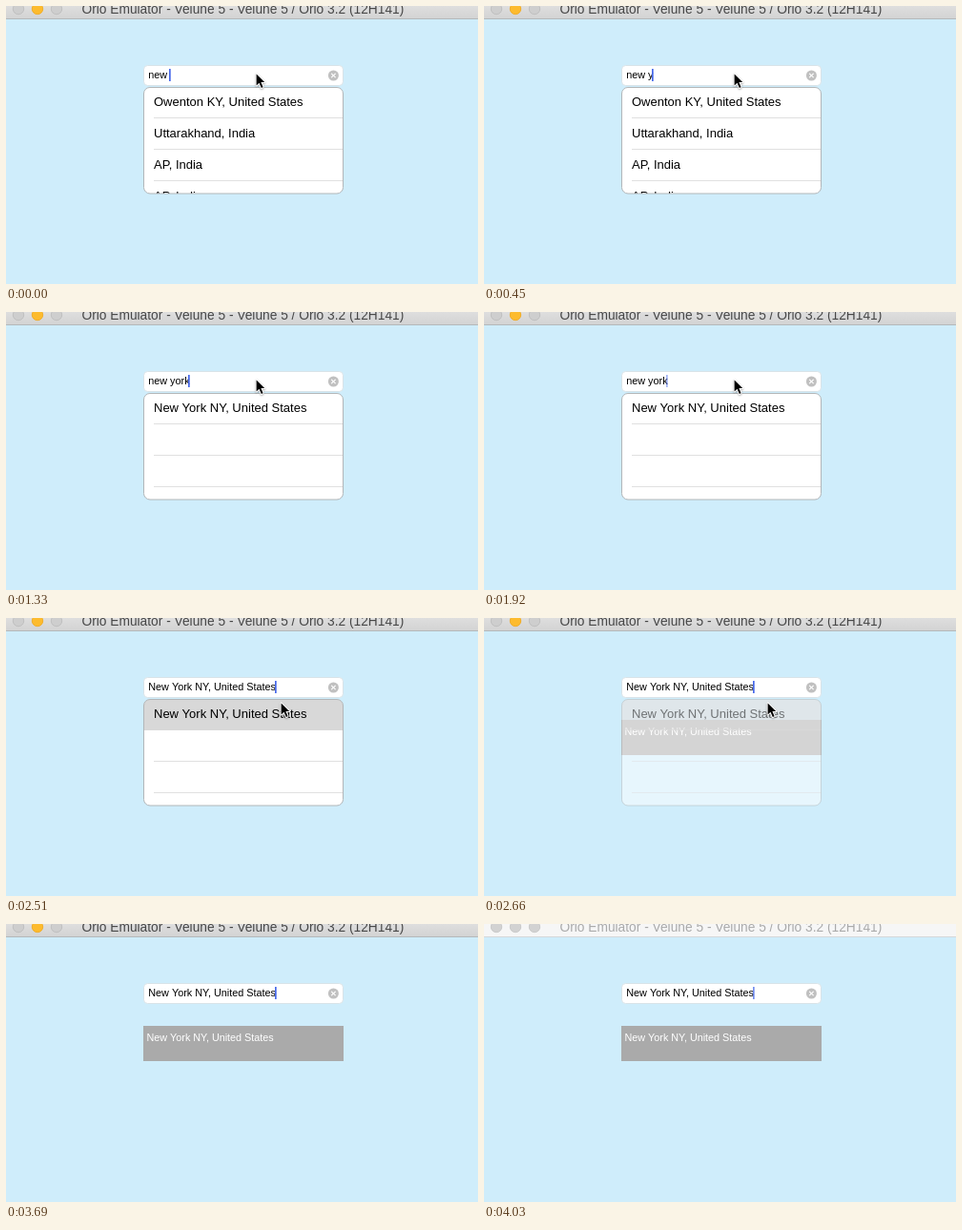
An HTML page with a canvas for the animation above (4.05 s loop, 495 by 292 pixels).

```html
<!DOCTYPE html>
<html lang="en">
<head>
<meta charset="utf-8">
<title>Place search</title>
<style>
html, body { margin: 0; width: 100%; height: 100%; overflow: hidden; background: #cfedfb; }
canvas { display: block; width: 495px; height: 292px; }
</style>
</head>
<body>
<canvas id="stage"></canvas>
<script>
const W = 495, H = 292, LOOP = 4050;
const FONT = '"Liberation Sans", Arial, sans-serif';
const PLACE = 'New York NY, United States';

const canvas = document.getElementById('stage');
const ctx = canvas.getContext('2d');
const ratio = window.devicePixelRatio || 1;
canvas.width = W * ratio;
canvas.height = H * ratio;

const oneLine = { pitch: 33, first: 117.5 };
const twoLine = { pitch: 48, first: 132.5 };
const lists = {
  wide: { ...oneLine, rows: [['Owenton KY, United States'], ['Uttarakhand, India'], ['AP, India'], ['AP, India']] },
  yarrow: { ...twoLine, rows: [['New Yarrow Rd, Ottermere TX', '00417, United States']] },
  tansey: { ...twoLine, rows: [['New Tansey Rd, Ferrowick CA', '00412, United States']] },
  city: { ...oneLine, rows: [[PLACE]] }
};

// Each step changes only the listed properties and holds until the next one.
const steps = [
  [0, { query: 'new ', caret: 1, list: 'wide', listAlpha: 1, picked: false, label: false, pointer: [262, 70], active: true }],
  [450, { query: 'new y' }],
  [590, { list: 'yarrow' }],
  [740, { query: 'new yo', list: 'tansey' }],
  [1330, { query: 'new york', list: 'city' }],
  [1920, { caret: 0.5 }],
  [2070, { caret: 0, pointer: [285, 106] }],
  [2220, { pointer: [286, 102] }],
  [2360, { caret: 0.5, pointer: [286, 97] }],
  [2510, { caret: 1, query: PLACE, picked: true, pointer: [288, 88] }],
  [2660, { label: true, listAlpha: 0.5, pointer: [297, 88] }],
  [2810, { listAlpha: 0, pointer: [306, 87] }],
  [2960, { pointer: [474, 246] }],
  [3100, { caret: 0.5, pointer: [418, 209] }],
  [3250, { caret: 0 }],
  [3400, { pointer: [450, 280] }],
  [3550, { caret: 0.5, pointer: null }],
  [3690, { caret: 1 }],
  [4030, { caret: 0.75, active: false }]
];

function stateAt(time) {
  return Object.assign({}, ...steps.filter(([start]) => start <= time).map(([, change]) => change));
}

function text(str, x, y, size, color) {
  ctx.font = `${size}px ${FONT}`;
  ctx.fillStyle = color;
  ctx.fillText(str, x, y);
}

function rect(x, y, w, h, color) {
  ctx.fillStyle = color;
  ctx.fillRect(x, y, w, h);
}

function roundPath(x, y, w, h, r) {
  ctx.beginPath();
  ctx.roundRect(x, y, w, h, r);
}

function paint(fill, stroke, width = 1) {
  if (fill) {
    ctx.fillStyle = fill;
    ctx.fill();
  }
  if (stroke) {
    ctx.strokeStyle = stroke;
    ctx.lineWidth = width;
    ctx.stroke();
  }
}

function disc(x, y, r, fill, stroke) {
  ctx.beginPath();
  ctx.arc(x, y, r, 0, Math.PI * 2);
  paint(fill, stroke);
}

function drawTitleBar(active) {
  const shade = ctx.createLinearGradient(0, 0, 0, 13);
  shade.addColorStop(0, active ? '#dedede' : '#f6f6f6');
  shade.addColorStop(1, active ? '#d3d3d3' : '#f6f6f6');
  rect(0, 0, W, 13, shade);
  rect(0, 13, W, 1, active ? '#b4b8ba' : '#d4d8da');
  [13, 33, 53].forEach((x, i) => {
    if (active && i === 1) disc(x, 3, 5.7, '#fdbb2d', '#f0ae2c');
    else disc(x, 3, 5.7, active ? '#cecece' : '#d2d2d2', active ? '#c0c0c0' : '#cacaca');
  });
  text('Orlo Emulator - Velune 5 - Velune 5 / Orlo 3.2 (12H141)', 79.5, 8, 13.75, active ? '#474747' : '#aaaaaa');
}

function drawField(query, caret) {
  roundPath(144.5, 62.5, 209, 21, 4);
  paint('#ffffff', '#d9e3e8');
  text(query, 149.2, 76, 10.85, '#000000');
  const caretX = Math.floor(149 + ctx.measureText(query).width - 0.4);
  ctx.globalAlpha = caret;
  rect(caretX, 66, 1.7, 13, '#4668ea');
  ctx.globalAlpha = 1;

  disc(343.4, 73, 5.5, '#c0c0c0');
  ctx.beginPath();
  for (const d of [-1, 1]) {
    ctx.moveTo(343.4 - 2.2, 73 - 2.2 * d);
    ctx.lineTo(343.4 + 2.2, 73 + 2.2 * d);
  }
  paint(null, '#ffffff', 1.2);
}

function drawLabel() {
  rect(144, 107, 210, 37, '#aaaaaa');
  text(PLACE, 147.5, 123, 10.8, '#ffffff');
}

function drawList({ rows, first, pitch }, picked, alpha) {
  const frame = () => roundPath(144.5, 85.5, 209, 111.5, 6.5);
  ctx.save();
  ctx.globalAlpha = alpha;
  frame();
  paint('#ffffff');
  ctx.save();
  ctx.clip();
  for (let y = first; y < 197; y += pitch) rect(155, y - 0.5, 199, 1, '#e0e0e0');
  if (picked) rect(144, 85, 210, 33, '#d8d8d8');
  rows.forEach((lines, row) => lines.forEach((line, i) => {
    text(line, 155, 105 + row * pitch + i * 16, 13, '#000000');
  }));
  ctx.restore();
  frame();
  paint(null, '#b2b6b8');
  ctx.restore();
}

function drawPointer([x, y]) {
  ctx.save();
  ctx.translate(x, y);
  ctx.beginPath();
  [[0.6, 1.4], [0.6, 13.4], [3.5, 10.7], [5.8, 16], [7.6, 15.2], [5.4, 10.1], [9.2, 10]]
    .forEach(([px, py]) => ctx.lineTo(px, py));
  ctx.closePath();
  ctx.lineJoin = 'round';
  ctx.shadowColor = 'rgba(0, 0, 0, 0.3)';
  ctx.shadowBlur = 2 * ratio;
  ctx.shadowOffsetY = ratio;
  paint(null, '#ffffff', 2);
  ctx.shadowColor = 'transparent';
  paint('#000000');
  ctx.restore();
}

function draw(time) {
  const s = stateAt(time);
  ctx.setTransform(ratio, 0, 0, ratio, 0, 0);
  rect(0, 0, W, H, '#cfedfb');
  drawTitleBar(s.active);
  drawField(s.query, s.caret);
  if (s.label) drawLabel();
  if (s.listAlpha) drawList(lists[s.list], s.picked, s.listAlpha);
  if (s.pointer) drawPointer(s.pointer);
}

const began = performance.now();
function tick() {
  draw((performance.now() - began) % LOOP);
  requestAnimationFrame(tick);
}
tick();
</script>
</body>
</html>
```
